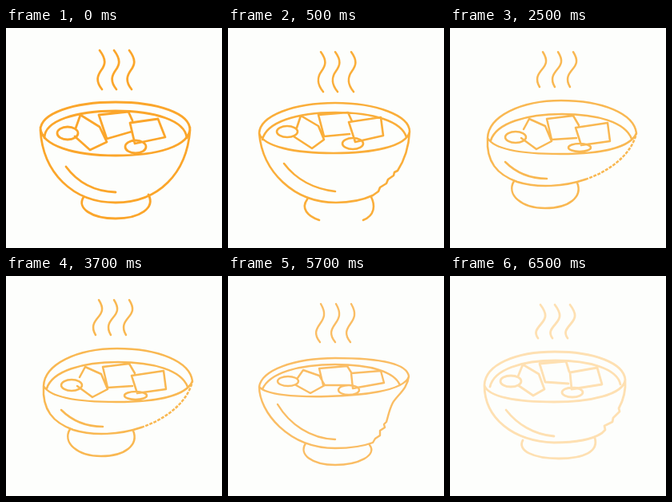
An HTML page for the animation above (8 s loop, 270 by 276 pixels).

```html
<!DOCTYPE html>
<html lang="en">
<head>
<meta charset="utf-8">
<title>Soup bowl</title>
<style>
html, body { margin: 0; width: 100%; height: 100%; overflow: hidden; background: #fdfefc; }
svg { display: block; width: 100%; height: 100%; }
path { fill: none; stroke-linecap: round; stroke-linejoin: round; }
</style>
</head>
<body>
<svg viewBox="0 0 270 276"><path id="line"/><path id="dots" stroke-dasharray="4 1.5" style="stroke-linecap:butt"/></svg>
<script>
// Each pose: end time, colour, line width, steam, then the bowl's outline.
const poses = [
  { end: 500, color: '#fba62b', width: 2.8,
    steam: [[117, 28], [135, 28], [154, 28]], curl: 'c9 12 7 18 2 25 s-7 14 1 24',
    bowl: `M43 128 C43 107 84 93 137 93 S230 107 230 128
      M43 125 C44 148 86 160 137 160 S230 149 230 125
      M48 138 C48 116 88 104 137 104 S224 116 226 138
      M43 128 C46 181 83 219 137 219 S226 182 230 128
      M97 212 C88 226 107 239 137 239 S187 226 178 209
      M75 174 C89 193 110 205 137 206`,
    food: `M93 109 L117 124 L126 143 L105 153 L86 136 M93 109 L87 126
      M116 109 L153 105 L158 116 M116 109 L126 139 L157 130
      M155 119 L190 114 L199 137 L161 145 Z
      M64 132 a13 8 0 1 0 26 0 a13 8 0 1 0 -26 0
      M149 149 a13 8 0 1 0 26 0 a13 8 0 1 0 -26 0` },
  { end: 2500, color: '#faae3a', width: 2.6,
    steam: [[116, 30], [134, 30], [154, 30]], curl: 'c8 11 6 17 1 24 s-7 15 2 26',
    bowl: `M39 132 C40 110 82 94 134 94 S227 110 227 130
      M39 132 C44 149 84 157 132 157 S223 149 227 130
      M43 140 C48 118 86 106 134 106 S217 117 223 137
      M39 132 C43 180 82 219 135 219 C153 219 168 216 181 210
      M227 130 C226 149 221 165 212 179 L208 181 L207 185 L200 190 L198 195 L190 200 L188 205 L181 210
      M99 215 C91 226 99 236 114 241 M169 241 C184 235 184 222 179 212
      M70 170 C85 190 108 202 134 205`,
    food: `M91 110 L113 123 L120 140 L105 151 L82 136 M91 110 L86 125
      M113 109 L150 106 L155 117 M113 109 L120 136 L152 133
      M151 118 L191 112 L194 135 L159 143 Z
      M61 130 a13 7 0 1 0 26 0 a13 7 0 1 0 -26 0
      M143 145 a13 7 0 1 0 26 0 a13 7 0 1 0 -26 0` },
  { end: 4500, color: '#f9b852', width: 2.5,
    steam: [[116, 30], [135, 30], [154, 30]], curl: 'c7 11 4 16 -1 22 s-9 12 -3 22',
    bowl: `M47 138 C48 111 88 91 139 91 S230 107 233 132
      M47 138 C55 152 90 158 138 158 S225 151 233 132
      M51 141 C58 119 96 108 140 108 S219 118 227 139
      M47 138 C45 168 59 184 84 193 C109 201 143 199 169 190
      M80 192 C70 209 89 226 119 226 S166 212 159 194
      M69 168 C82 181 100 189 121 189`,
    dots: 'M169 190 C199 180 227 159 233 132',
    food: `M99 114 L119 123 L127 142 L108 152 L89 138 M99 114 L92 127
      M121 114 L154 110 L161 122 M121 114 L127 140 L158 138
      M157 125 L197 119 L200 142 L164 147 Z
      M69 137 a13 7 0 1 0 26 0 a13 7 0 1 0 -26 0
      M148 150 a14 5 0 1 0 28 0 a14 5 0 1 0 -28 0` },
  { end: 6500, color: '#fabd64', width: 2.4,
    steam: [[116, 35], [135, 35], [154, 35]], curl: 'c7 12 4 18 -1 25 s-8 13 0 23',
    bowl: `M39 139 C42 118 83 103 134 103 S224 109 226 126
      M39 139 C47 149 84 152 124 151 S220 145 226 126
      M43 142 C52 121 90 111 134 111 S208 120 215 137
      M39 139 C39 170 75 216 134 216 C153 216 168 214 181 209
      M226 126 C224 142 212 149 206 159 C201 169 200 177 198 183 L195 186 L196 190 L190 194 L190 200 L184 204 L181 209
      M97 210 C88 224 105 237 134 237 S187 225 177 212
      M62 161 C77 186 103 204 134 205`,
    food: `M94 118 L114 125 L121 137 L103 147 L85 137 M94 118 L87 128
      M114 116 L149 113 L154 121 M114 116 L119 137 L152 137
      M154 122 L191 119 L195 134 L156 141 Z
      M62 132 a13 6 0 1 0 26 0 a13 6 0 1 0 -26 0
      M138 143 a13 6 0 1 0 26 0 a13 6 0 1 0 -26 0` },
  { end: 8000, color: '#fee0b2', width: 2.8,
    steam: [[113, 36], [131, 36], [150, 36]], curl: 'c9 12 7 17 1 24 s-9 11 -4 18',
    bowl: `M43 137 C44 111 82 95 131 95 S217 109 219 130
      M43 137 C47 152 85 158 130 158 S217 149 219 130
      M50 139 C55 117 90 106 132 106 S209 116 213 136
      M43 137 C43 178 78 207 130 209 C158 209 178 205 190 197
      M219 130 C220 146 216 157 211 166 L212 170 L204 178 L203 183 L193 188 L194 193 L190 197
      M91 206 C84 219 104 229 136 229 S186 220 181 203
      M70 168 C84 186 105 199 130 201`,
    food: `M91 111 L111 123 L118 142 L104 150 L85 137 M91 111 L85 126
      M112 110 L145 107 L149 120 M112 110 L119 133 L148 135
      M150 121 L184 115 L190 136 L152 142 Z
      M63 132 a13 7 0 1 0 26 0 a13 7 0 1 0 -26 0
      M140 146 a13 6 0 1 0 26 0 a13 6 0 1 0 -26 0` }
];

const line = document.getElementById('line');
const dots = document.getElementById('dots');
const start = performance.now();
let shown;

function draw(now) {
  const t = Math.max(0, now - start) % 8000;
  const pose = poses.find(p => t < p.end);
  if (pose !== shown) {
    shown = pose;
    const steam = pose.steam.map(([x, y]) => `M${x} ${y} ${pose.curl}`).join(' ');
    line.setAttribute('d', steam + pose.bowl + pose.food);
    dots.setAttribute('d', pose.dots || '');
    for (const path of [line, dots]) {
      path.setAttribute('stroke', pose.color);
      path.setAttribute('stroke-width', pose.width);
    }
  }
  requestAnimationFrame(draw);
}
draw(start);
</script>
</body>
</html>
```
